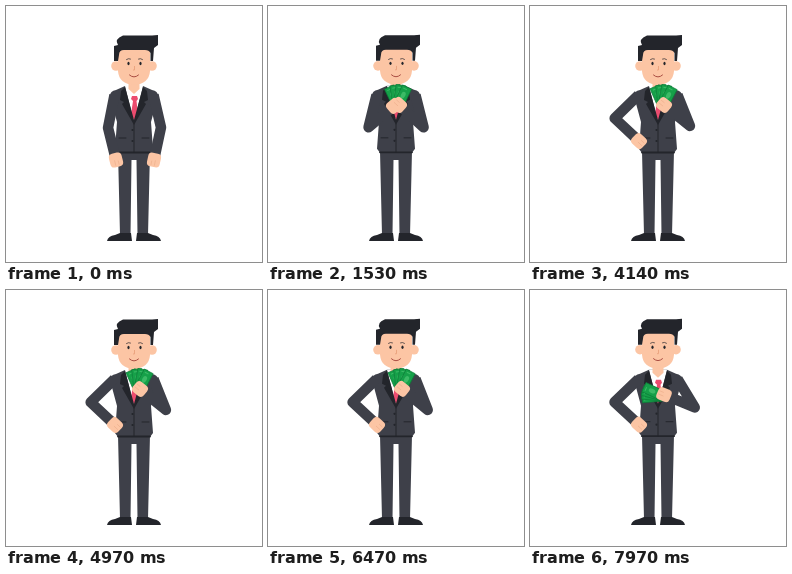
An HTML page for the animation above (8 s loop, 256 px wide and 256 px high).

```html
<!DOCTYPE html>
<html lang="en">
<head>
<meta charset="utf-8">
<title>Man with cash</title>
<style>
html, body { margin: 0; width: 100%; height: 100%; overflow: hidden; background: #fff; }
svg { display: block; width: 100vw; height: 100vh; }
.suit { fill: #3e4049; }
.dark { fill: #23252b; }
.skin { fill: #fcc5a4; }
.sleeve { fill: none; stroke: #3e4049; stroke-width: 10.5; stroke-linejoin: round; }
.line { fill: none; stroke: #23252b; stroke-linecap: round; }
.mirror { transform: translateX(256px) scaleX(-1); }
</style>
</head>
<body>
<svg viewBox="0 0 256 256">
  <defs>
    <g id="leg">
      <path class="suit" d="M112 145H128V154H125.500L124.500 229H114Z"/>
      <path class="dark" d="M101 235Q102 230 109 229L114 227H125L126 235Z"/>
    </g>
    <path id="lapel" class="dark" d="M119 81L115 85L114 94L118 96L116 98L128 119V114Z"/>
    <g id="bill">
      <rect x="-5" y="-21" width="10" height="20" fill="#16a049" stroke="#0c7d38" stroke-width=".7"/>
      <ellipse cy="-12" rx="2.200" ry="3.500" fill="#3cba66"/>
      <path d="M-3 -18.500H1" stroke="#3cba66"/>
    </g>
    <g id="fist">
      <rect class="skin" x="-7" y="-6.500" width="14" height="13" rx="4"/>
      <path d="M0 1.500H5.500M1 -2H5.500" stroke="#eeb18e" stroke-width=".7"/>
    </g>
  </defs>
  <use href="#leg"/>
  <use href="#leg" class="mirror"/>
  <g id="torso">
    <path class="suit" d="M104 90Q104 85 110 84L119 80H137L146 84Q152 85 152 90L145 116L147 143L144 147H112L109 143L111 116Z"/>
    <path class="line" d="M112 146.500H144" stroke-width="1.800"/>
    <path d="M119 80H137L128 116Z" fill="#fff"/>
    <path class="skin" d="M122.500 74H133.500V83L128 88L122.500 83Z"/>
    <path d="M126 90H131L132 93L130.500 95L132 108L128.500 115L125 108L127 95L125 93Z" fill="#ec4c6f"/>
    <use href="#lapel"/>
    <use href="#lapel" class="mirror"/>
    <path class="line" d="M128 118V146M113 132H120M136 132H143"/>
    <circle class="dark" cx="126.500" cy="124" r="1.100"/>
    <circle class="dark" cx="126.500" cy="135" r="1.100"/>
  </g>
  <path class="sleeve" id="leftSleeve"/>
  <path class="sleeve" id="rightSleeve"/>
  <g id="head">
    <circle class="skin" cx="110" cy="60" r="4.800"/>
    <circle class="skin" cx="146" cy="60" r="4.800"/>
    <path class="skin" d="M112 43H144V65Q143 78 128 79Q113 78 112 65Z"/>
    <path class="dark" d="M108 55V40L112 39Q108 33 117 29.500H146L152 29V39L148 42L147 55H144.500V47Q143 44 139 44H118Q113 44 113 49L112 55Z"/>
    <path class="line" d="M120.500 53.500Q122.500 52 124.500 53M132.500 53Q134.500 52 136.500 53.500" stroke-width=".7"/>
    <ellipse class="dark" cx="122.500" cy="57.500" rx="1.100" ry="1.700"/>
    <ellipse class="dark" cx="134.500" cy="57.500" rx="1.100" ry="1.700"/>
    <path d="M128.500 60V64H127" fill="none" stroke="#eba580"/>
    <path d="M123.500 69Q128 73 132.500 69" fill="none" stroke="#a94d42" stroke-linecap="round"/>
  </g>
  <g id="cash"></g>
  <use href="#fist" id="leftHand"/>
  <use href="#fist" id="rightHand"/>
</svg>
<script>
const LOOP = 8000, BILLS = 4, BONE = 33.3, BREATH = 1660, CASH_FROM = 850;
const el = id => document.getElementById(id);

// Hand positions, fan tilt and degrees between bills
const rest = { lx: 110, ly: 154, rx: 148, ry: 154, tilt: -40, spread: 2 };
const offer = { lx: 126, ly: 100, rx: 131, ry: 99, tilt: 0, spread: 17 };
const proud = { ...offer, lx: 109, ly: 135, rx: 134, tilt: 2 };
const stow = { ...proud, rx: 134, ry: 105, tilt: -80, spread: 10 };
const moves = [
  { to: offer, from: 250, until: 1450 },
  { to: proud, from: 2680, until: 3350 },
  { to: stow, from: 7500, until: 7850 }
];

const smooth = p => p * p * (3 - 2 * p);

function poseAt(t) {
  const pose = { ...rest };
  for (const { to, from, until } of moves) {
    const p = smooth(Math.min(1, Math.max(0, (t - from) / (until - from))));
    for (const key in pose) pose[key] += (to[key] - pose[key]) * p;
  }
  return pose;
}

// Two equal bones; the elbow bends away from the body (side is -1 or 1)
function drawArm(name, side, hx, hy) {
  const sx = 128 + side * 19.5, sy = 89;
  const dx = hx - sx, dy = hy - sy, reach = Math.hypot(dx, dy);
  const bend = side * Math.sqrt(Math.max(0, BONE ** 2 - reach ** 2 / 4)) / reach;
  const ex = sx + dx / 2 + dy * bend, ey = sy + dy / 2 - dx * bend;
  const angle = Math.atan2(hy - ey, hx - ex);
  const wx = hx - 5 * Math.cos(angle), wy = hy - 5 * Math.sin(angle);
  el(name + "Sleeve").setAttribute("d", `M${sx} ${sy}L${ex} ${ey}L${wx} ${wy}`);
  el(name + "Hand").setAttribute("transform",
    `translate(${hx} ${hy}) rotate(${angle * 180 / Math.PI}) scale(1 ${-side})`);
}

const bills = Array.from({ length: BILLS }, () => {
  const bill = document.createElementNS("http://www.w3.org/2000/svg", "use");
  bill.setAttribute("href", "#bill");
  return el("cash").appendChild(bill);
});

function draw(t) {
  const { lx, ly, rx, ry, tilt, spread } = poseAt(t);
  const breath = 0.3 * Math.sin(t / BREATH * 2 * Math.PI);
  for (const part of ["torso", "head"])
    el(part).setAttribute("transform", `translate(0 ${breath})`);
  drawArm("left", -1, lx, ly + breath);
  drawArm("right", 1, rx, ry + breath);

  el("cash").setAttribute("visibility", t < CASH_FROM ? "hidden" : "visible");
  el("cash").setAttribute("transform", `translate(${rx - 1} ${ry + 1}) rotate(${tilt})`);
  bills.forEach((bill, i) =>
    bill.setAttribute("transform", `rotate(${(i - (BILLS - 1) / 2) * spread})`));
}

const start = performance.now();
function tick(now) {
  draw(Math.max(0, now - start) % LOOP);
  requestAnimationFrame(tick);
}
draw(0);
requestAnimationFrame(tick);
</script>
</body>
</html>
```
